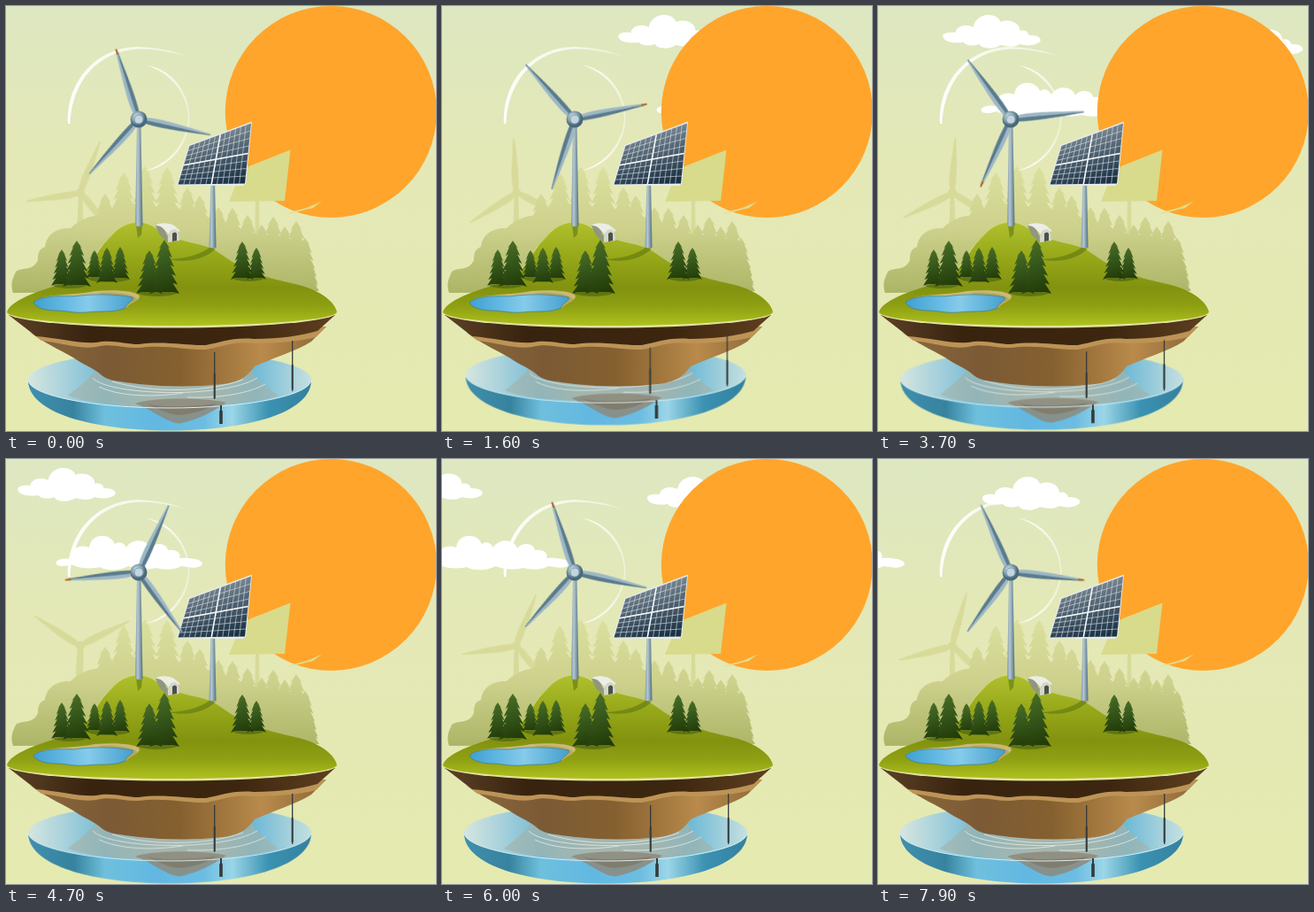
Write an HTML page that moves like this. It is 486 px wide and 480 px high and loops after 8000 ms.

```html
<!DOCTYPE html>
<html lang="en">
<head>
<meta charset="utf-8">
<title>Clean energy island</title>
<style>
  html, body { margin: 0; width: 100%; height: 100%; overflow: hidden; }
  svg { display: block; width: 100%; height: 100%; }
  .spin { animation: spin 8s steps(80) infinite; }
  .drift { animation: drift 8s steps(80) infinite; }
  .bob { transform-origin: 185px 423px; animation: bob 8s linear infinite; }
  @keyframes spin { to { transform: rotate(480deg); } }
  @keyframes drift { to { transform: translateX(-480px); } }
  @keyframes bob {
    0%, 62%, 100% { transform: none; }
    10% { transform: translateY(-2.8px) scale(.995); }
    20%, 24% { transform: translateY(-5.6px) scale(.99); }
    33% { transform: translateY(-4px) scale(.992); }
    46% { transform: translateY(-.8px) scale(.998); }
  }
</style>
</head>
<body>
<svg viewBox="0 0 486 480" preserveAspectRatio="none">
  <defs>
    <linearGradient id="sky" x2="0" y2="1">
      <stop stop-color="#dde7c1"/><stop offset=".32" stop-color="#e3e8b7"/><stop offset="1" stop-color="#e5eab0"/>
    </linearGradient>
    <linearGradient id="far" gradientUnits="userSpaceOnUse" x1="0" y1="180" x2="0" y2="322">
      <stop stop-color="#dce09f"/><stop offset=".5" stop-color="#cdd18c"/><stop offset="1" stop-color="#adb668"/>
    </linearGradient>
    <linearGradient id="hill" gradientUnits="userSpaceOnUse" x1="0" y1="245" x2="0" y2="363">
      <stop stop-color="#afbf2e"/><stop offset=".3" stop-color="#98aa1a"/>
      <stop offset=".62" stop-color="#82920f"/><stop offset=".8" stop-color="#8fa013"/><stop offset="1" stop-color="#b2c41f"/>
    </linearGradient>
    <linearGradient id="soil">
      <stop stop-color="#8a683d"/><stop offset=".25" stop-color="#7b5a35"/>
      <stop offset=".5" stop-color="#85602f"/><stop offset=".78" stop-color="#b98a4b"/><stop offset="1" stop-color="#8d6838"/>
    </linearGradient>
    <linearGradient id="crust">
      <stop stop-color="#5d4126"/><stop offset=".25" stop-color="#38230f"/><stop offset=".7" stop-color="#3d260f"/><stop offset="1" stop-color="#5f4020"/>
    </linearGradient>
    <linearGradient id="side">
      <stop stop-color="#3f8fae"/><stop offset=".16" stop-color="#37839f"/><stop offset=".27" stop-color="#6fc0dd"/>
      <stop offset=".45" stop-color="#62b8e2"/><stop offset=".62" stop-color="#6cbde2"/>
      <stop offset=".72" stop-color="#9bd6e8"/><stop offset=".85" stop-color="#3b92b2"/><stop offset="1" stop-color="#34809f"/>
    </linearGradient>
    <linearGradient id="surface">
      <stop stop-color="#d6e6e0"/><stop offset=".12" stop-color="#acd3dc"/><stop offset=".27" stop-color="#76bbd4"/><stop offset=".45" stop-color="#a9bfba"/>
      <stop offset=".65" stop-color="#a8bfbb"/><stop offset=".8" stop-color="#70bad6"/><stop offset="1" stop-color="#c6e0e0"/>
    </linearGradient>
    <linearGradient id="pond">
      <stop stop-color="#419fd0"/><stop offset=".3" stop-color="#62b8e2"/><stop offset=".55" stop-color="#86cbea"/><stop offset="1" stop-color="#459fcd"/>
    </linearGradient>
    <linearGradient id="steel">
      <stop stop-color="#7f9aa8"/><stop offset=".35" stop-color="#b5c8d1"/><stop offset="1" stop-color="#51707f"/>
    </linearGradient>
    <linearGradient id="glass" x1=".3" y1="0" x2=".6" y2="1">
      <stop stop-color="#8f9ba6"/><stop offset=".45" stop-color="#586977"/><stop offset="1" stop-color="#1b3245"/>
    </linearGradient>
    <linearGradient id="needles" x1=".4" x2=".6" y2="1">
      <stop stop-color="#4a6e26"/><stop offset=".5" stop-color="#34551a"/><stop offset="1" stop-color="#223a08"/>
    </linearGradient>
    <linearGradient id="gust">
      <stop stop-color="#fff" stop-opacity=".95"/><stop offset="1" stop-color="#fff" stop-opacity=".45"/>
    </linearGradient>
    <radialGradient id="hub" cx=".4" cy=".35">
      <stop stop-color="#e6f0f4"/><stop offset=".45" stop-color="#9db8c5"/><stop offset="1" stop-color="#49697c"/>
    </radialGradient>
    <path id="puff" d="M2 27C-3 20 9 19 15 20C16 12 28 10 35 14C38-3 62-4 66 8C76 4 88 9 88 18C96 16 98 22 98 23C110 22 115 29 108 32C101 36 92 34 88 33C80 38 70 35 66 34C58 40 44 38 42 33C34 36 26 34 24 31C16 32 6 32 2 27Z"/>
    <path id="bank" d="M2 33C-4 27 10 24 17 26C17 13 28 9 38 13C40-4 62-4 67 9C72 5 78 8 80 13C86 2 104 3 107 14C112 6 126 8 127 16C140 14 142 22 140 25C150 24 167 26 166 32C162 38 150 35 142 34C134 39 122 38 114 36C100 39 90 37 82 34C74 39 58 40 50 35C38 38 24 36 18 32C12 34 6 35 2 33Z"/>
    <g id="blade">
      <path fill="#9db7c4" d="M-2.400-4C-6-14-5.600-28-.8-83L1-83L1-4Z"/>
      <path fill="#5a7b8d" d="M-.2-4C-1-24 0-45 .4-83L1-83C3-50 5.200-24 2.800-4Z"/>
    </g>
    <path id="vane" d="M-2 0C-6-12-4.500-24-.6-62L.8-62C3-36 5-14 2 0Z"/>
  </defs>

  <rect width="486" height="480" fill="url(#sky)"/>

  <g class="drift" fill="#fff">
    <use href="#puff" x="294.500" y="10"/>
    <use href="#bank" x="338" y="87"/>
    <use href="#puff" x="591" y="20"/>
  </g>
  <circle cx="367.3" cy="119.5" r="119.5" fill="#ffa52b"/>

  <!-- distant silhouettes -->
  <g fill="#d7da99">
    <path d="M82 211H86L88 262H80Z"/>
    <circle cx="84" cy="211" r="5"/>
    <g transform="translate(84 211) rotate(21)"><g class="spin">
      <use href="#vane"/><use href="#vane" transform="rotate(120)"/><use href="#vane" transform="rotate(240)"/>
    </g></g>
    <path fill="#d8db8b" d="M267 184L321.500 162.500L315 220L252 221Z"/>
    <path d="M282 220H286L287 275H281Z"/>
    <path fill="#dfdf98" d="M318 235C328 230 335 230 343 226.500L357 220.500L347 228C340 230 330 232 318 235Z"/>
    <path d="M335 231L354 222" stroke="#f6c45a" stroke-width=".7" fill="none"/>
  </g>
  <path id="woods" fill="url(#far)"/>
  <path fill="url(#far)" d="M8 324C4 312 9 306 11 300C20 294 30 300 36 287C36 275 40 274 44 272C46 256 60 250 73 251C84 240 100 235 110 237L130 222L205 230L262 250L330 274L353 322Z"/>

  <!-- water dish -->
  <g class="bob">
    <path fill="url(#side)" d="M25 421C23 460 100 479.500 185 479.500S347 460 345 421Z"/>
    <ellipse cx="185" cy="422" rx="160" ry="32" fill="url(#surface)"/>
    <path fill="#a3b2aa" opacity=".65" d="M70 440C90 425 98 415 108 404H272C285 425 297 432 308 440C260 456 115 457 70 440Z"/>
    <path fill="#8e8a7c" opacity=".85" d="M146 449C165 442 225 442 249 448C236 456 222 466 196 471.500C180 470 170 458 146 449Z"/>
    <path fill="#7f7563" opacity=".7" d="M158 449C175 454 215 452 238 449C222 458 210 461 196 462C182 461 172 455 158 449Z"/>
    <path fill="none" stroke="#d6eef2" d="M25 422A160 32 0 0 0 345 422"/>
    <g fill="none" stroke="#e6f1ee" opacity=".75">
      <path d="M98 420C115 440 245 444 284 420M105 430C135 444 180 440 200 437M120 424C165 438 230 436 268 422M205 442C245 443 275 437 293 427"/>
    </g>
  </g>

  <!-- floating ground -->
  <path fill="url(#soil)" d="M30 370C48 384 66 390 82 401C94 408 100 410 108 417C116 424 130 424 150 427Q200 432 245 427C268 424 274 416 281 407C300 398 328 390 345 379L362 362Z"/>
  <path fill="#bd9456" d="M28 369L40 378C65 381 85 388 102 385C119 380 135 387 150 386C180 382 205 389 226 388C243 386 255 378 280 381C310 381 335 378 350 374L362 362Z"/>
  <path fill="url(#crust)" d="M3 349L34 373C60 375 85 382 102 380C119 376 135 382 150 382C180 378 205 384 226 383C243 380 255 374 280 376C310 376 335 372 352 367L372 349Z"/>
  <path fill="#e0e4a0" d="M1 346A186.500 17.500 0 0 0 374 346L350 335H20Z"/>
  <path fill="url(#hill)" d="M1 345.500C5 333 34 322 70 312C90 305 100 283 110 269C120 259 128 245 149 244C166 244 174 256 190 262C208 268 222 269 235 275C248 283 260 294 282 301C306 312 334 313 350 322C362 328 372 336 374 345.500A186.500 15.500 0 0 1 1 345.500Z"/>
  <path fill="none" stroke="#d3dc83" stroke-width=".8" d="M90 297C98 287 104 277 110 269C120 259 128 245 149 244C166 244 174 256 190 262"/>
  <path fill="#5e7611" opacity=".6" d="M147 247H154L153 258L149 262ZM182 286C200 286 220 281 231 272L237 274C226 285 208 291 182 286Z"/>

  <path fill="#cbb977" d="M33 333C48 324 80 327 100 322C125 320 150 322 151 328C150 334 140 335 136 341Z"/>
  <path fill="#8c8431" d="M104 324C126 322 146 326 149 332C143 336 140 334 137 341L128 333Z" opacity=".35"/>
  <path fill="url(#pond)" stroke="#397d96" stroke-width=".7" d="M31 335C36 328 60 327 76 328C96 325 124 325 143 329C146 333 134 336 135 341C122 347 104 344 90 346C75 347 68 344 57 344C45 344 34 341 31 335Z"/>

  <g fill="#405a12" opacity=".55">
    <ellipse cx="72" cy="315" rx="19" ry="4"/><ellipse cx="116" cy="308" rx="23" ry="4"/>
    <ellipse cx="171" cy="323" rx="23" ry="5"/><ellipse cx="274" cy="307" rx="18" ry="4"/>
  </g>
  <g id="pines" fill="url(#needles)"></g>

  <path fill="#eceee5" d="M169 248C174 244 184 245 190 248L197 254L184 258C180 252 174 250 169 248Z"/>
  <path fill="#8f9781" d="M169 248C176 248 182 252 183 267L174 259Z"/>
  <path fill="#d3d6cb" d="M183 267C182 256 186 252 191 252Q196 253 196 265Z"/>
  <path fill="#4c5145" d="M188 266V257Q191 254 193 257V265Z"/>

  <!-- solar panel -->
  <path fill="url(#steel)" d="M231.500 196H236L237.500 273H229.500Z"/>
  <path fill="#e6ecee" d="M206.500 157L278 130.500L271.200 200.500L268 203L193 202.500Z"/>
  <path fill="url(#glass)" d="M207.500 158L277 132.500L270 200.500L194.500 201.500Z"/>
  <path id="cells" fill="none" stroke="#d3dce1" stroke-width=".65"/>
  <path id="cross" fill="none" stroke="#f4f7f7" stroke-width="1.5"/>

  <!-- main turbine -->
  <g fill="url(#gust)">
    <path d="M70 133C68 86 101 46 151 46Q181 47 207 58Q178 48.500 151 48.500C104 50 74 86 72.500 133Z"/>
    <path d="M158 66.500C190 72 207 99 207.500 126C207 157 185 182 158 186C184 178 205 155 206 126C205 99 186 75 158 66.500Z"/>
  </g>
  <path fill="url(#steel)" d="M148 132H152.400L154.500 248Q150 250 146 248Z"/>
  <g transform="translate(150 128) rotate(-18)"><g class="spin">
    <use href="#blade" transform="rotate(120)"/><use href="#blade" transform="rotate(240)"/><use href="#blade"/>
    <path fill="#b5672f" d="M-1.200-77L-.8-83.500H1L1.400-77Z"/>
  </g></g>
  <circle cx="150" cy="128" r="9.500" fill="url(#hub)"/>
  <circle cx="150" cy="128" r="5" fill="#c3d5de" stroke="#7f9dad"/>

  <!-- probes -->
  <g class="bob" fill="none" stroke="#343b3b">
    <path stroke-width="1.300" d="M235.700 391V444M323.700 378V435"/>
    <path stroke-width="3.600" d="M243 457V472"/>
    <path stroke-width="2" d="M243 451V458"/>
    <path stroke-width="2" d="M235.700 415V443M323.700 405V433"/>
  </g>
</svg>
<script>
  const el = id => document.getElementById(id);

  // Jagged conifer outline: down the right side, back up the left.
  function pine(x, top, base, half, tiers) {
    const right = [];
    for (let i = 1; i <= tiers; i++) {
      const y = top + (base - top) * i / tiers;
      const w = half * (.2 + .8 * Math.pow(i / tiers, .85));
      right.push([w, y], [w * .62, y - 2]);
    }
    const left = right.map(([w, y]) => [-w, y]).reverse();
    return `M${x} ${top}` + [...right, ...left].map(([w, y]) => `L${x + w} ${y}`).join('') + 'Z';
  }

  const woods = [[112, 212], [133, 188], [157, 181], [182, 182], [205, 205], [219, 214], [240, 227], [256, 228],
    [273, 236], [289, 247], [302, 238], [315, 249], [328, 243], [338, 262], [344, 286]];
  el('woods').setAttribute('d', woods.map(([x, top]) => {
    const base = Math.min(top + 72, 322);
    return pine(x, top, base, (base - top) * .27, 7);
  }).join(''));

  const pines = [[63, 275, 316, 12], [80, 265, 317, 16], [100, 276, 308, 10], [129, 272, 309, 11], [114, 273, 313, 12],
    [162, 276, 325, 15], [179, 264, 325, 17], [283, 273, 309, 11], [267, 266, 309, 13]];
  el('pines').innerHTML = pines.map(p => `<path d="${pine(...p, 6)}"/>`).join('');

  // Grid lines across the panel's four corners.
  const mix = (a, b, k) => [a[0] + (b[0] - a[0]) * k, a[1] + (b[1] - a[1]) * k];
  const [tl, tr, br, bl] = [[207.5, 158], [277, 132.5], [270, 200.5], [194.5, 201.5]];
  const column = k => `M${mix(tl, tr, k)}L${mix(bl, br, k)}`;
  const row = k => `M${mix(tl, bl, k)}L${mix(tr, br, k)}`;
  let grid = '';
  for (let i = 1; i < 12; i++) grid += column(i / 12);
  for (let i = 1; i < 8; i++) grid += row(i / 8);
  el('cells').setAttribute('d', grid);
  el('cross').setAttribute('d', column(.5) + row(.5));
</script>
</body>
</html>
```
